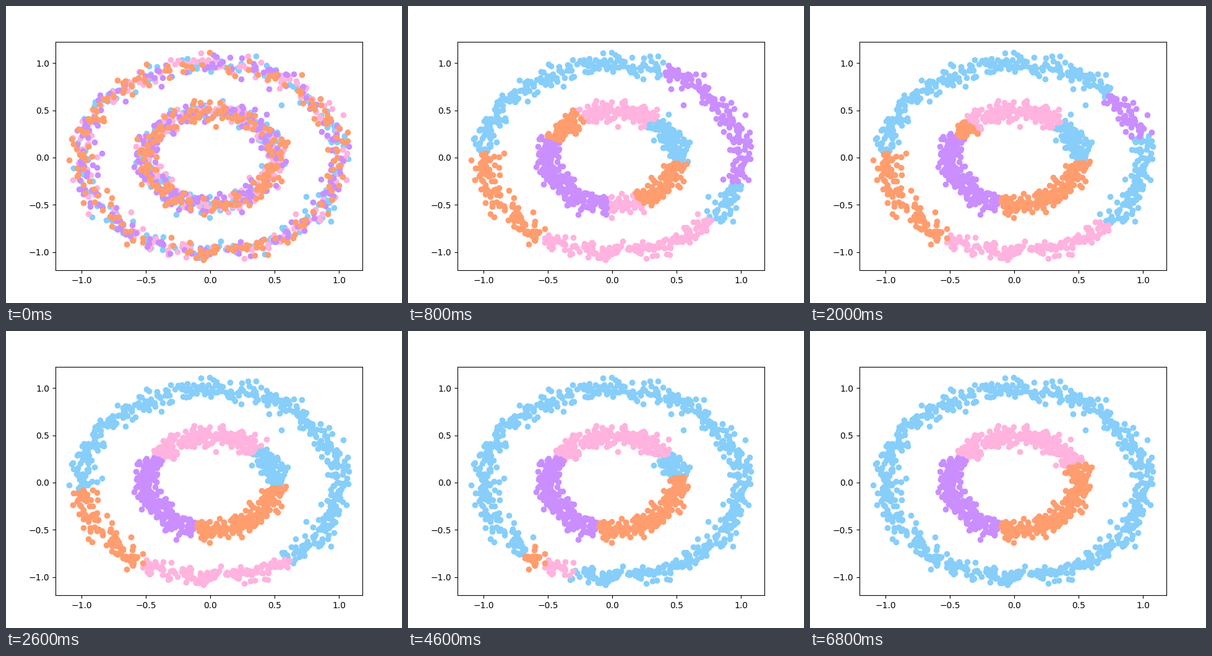
Animation of 640 by 480 pixels, one loop 7 s. Source, as a matplotlib script:

```python
import numpy as np
import matplotlib.pyplot as plt
from matplotlib.animation import FuncAnimation

FRAMES, INTERVAL = 35, 200
PER_RING, NOISE = 750, 0.05
BLUE, PINK, PURPLE, ORANGE = range(4)
COLORS = ["#87CEFA", "#FFB3DE", "#CA8EFF", "#FF9D6F"]

# Arcs of each ring: owner, start angle at first and at last (degrees),
# and the steps between which that start angle moves.
OUTER_ARCS = [
    (PURPLE, -16, 28, 4, 12),
    (BLUE, 67.5, 28, 4, 12),
    (ORANGE, 174, 238.5, 8, 25),
    (PINK, 238.5, 238.5, 8, 25),
    (BLUE, 319.5, 238.5, 8, 25),
]
INNER_ARCS = [
    (PINK, 49, 22, 4, 34),
    (ORANGE, 119, 148, 4, 13),
    (PURPLE, 159, 148, 4, 13),
    (PINK, 264, 257, 4, 9),
    (ORANGE, 296, 257, 4, 9),
    (BLUE, 356, 382, 8, 34),
]

rng = np.random.RandomState(0)


def make_rings():
    """Two noisy circles; returns the points and a mask of the outer ones."""
    t = np.linspace(0, 2 * np.pi, PER_RING, endpoint=False)
    circle = np.column_stack([np.cos(t), np.sin(t)])
    points = np.vstack([circle, circle * 0.5])
    order = np.arange(len(points))
    rng.shuffle(order)
    points = points[order] + rng.normal(scale=NOISE, size=points.shape)
    return points, order < PER_RING


def arc_start(first, last, begin, end, step):
    p = np.clip((step - begin) / (end - begin), 0, 1)
    return first + (last - first) * p ** 1.5


def arc_labels(angles, arcs, step):
    # The arcs start out scrambled and settle within a few steps.
    wobble = np.sin(5 * angles + 1) + 0.7 * np.sin(9 * angles + 2.5)
    deg = np.degrees(angles) + 42 * np.exp(1 - step) * wobble
    starts = np.array([arc_start(*arc[1:], step) for arc in arcs])
    place = (deg - starts[0]) % 360
    index = np.searchsorted(starts - starts[0], place, side="right") - 1
    return np.array([arc[0] for arc in arcs])[index]


points, is_outer = make_rings()
angles = np.arctan2(points[:, 1], points[:, 0])
start_labels = rng.randint(0, 4, len(points))

fig, ax = plt.subplots(figsize=(6.4, 4.8), dpi=100)
ax.set_xlim(-1.203, 1.182)
ax.set_ylim(-1.193, 1.227)
groups = [ax.scatter([], [], color=c) for c in COLORS]


def update(step):
    if step == 0:
        labels = start_labels
    else:
        labels = np.where(is_outer, arc_labels(angles, OUTER_ARCS, step),
                          arc_labels(angles, INNER_ARCS, step))
    for i, group in enumerate(groups):
        group.set_offsets(points[labels == i])
    return groups


anim = FuncAnimation(fig, update, frames=FRAMES, interval=INTERVAL,
                     init_func=lambda: update(0), repeat=True, repeat_delay=0)
plt.show()
```
